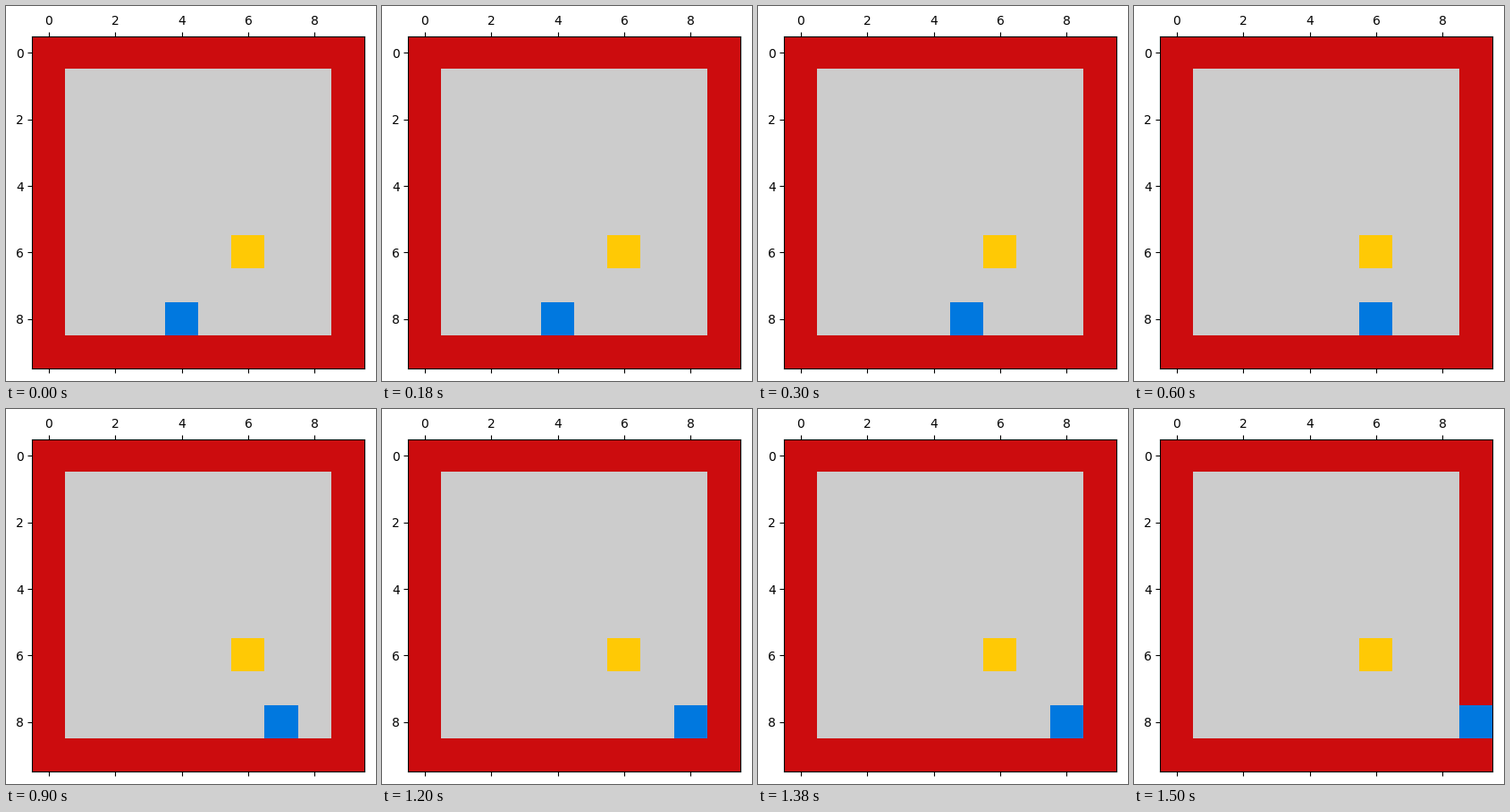
Write a matplotlib script that moves like this. It is 414 by 419 pixels and loops after 1800 ms.

```python
import numpy as np
import matplotlib.pyplot as plt
from matplotlib.animation import FuncAnimation

W, H, DPI = 414, 419, 100
SIZE, STEPS = 10, 6
LEFT, TOP, SIDE = 29.3, 33.7, 371.8

WALL = (204, 12, 14)
FLOOR = (204, 204, 204)
GOAL = (255, 201, 5)
AGENT = (0, 120, 223)

plt.rcParams["font.family"] = "DejaVu Sans"
plt.rcParams["font.size"] = 10


def room(step):
    """Room with the agent walking right along the bottom row."""
    grid = np.full((SIZE, SIZE, 3), WALL, dtype=np.uint8)
    grid[1:-1, 1:-1] = FLOOR
    grid[6, 6] = GOAL
    grid[8, 4 + step % STEPS] = AGENT
    return grid


# The small margin keeps the pixel size from being rounded down.
fig = plt.figure(figsize=((W + 0.01) / DPI, (H + 0.01) / DPI), dpi=DPI,
                 facecolor="white")
ax = fig.add_axes([LEFT / W, 1 - (TOP + SIDE) / H, SIDE / W, SIDE / H])
image = ax.matshow(room(0), interpolation="nearest")
ax.set_xticks(range(0, SIZE, 2))
ax.set_yticks(range(0, SIZE, 2))


def update(step):
    image.set_data(room(step))
    return (image,)


anim = FuncAnimation(fig, update, frames=STEPS, interval=300,
                     repeat=True, repeat_delay=0, blit=False)
plt.show()
```
